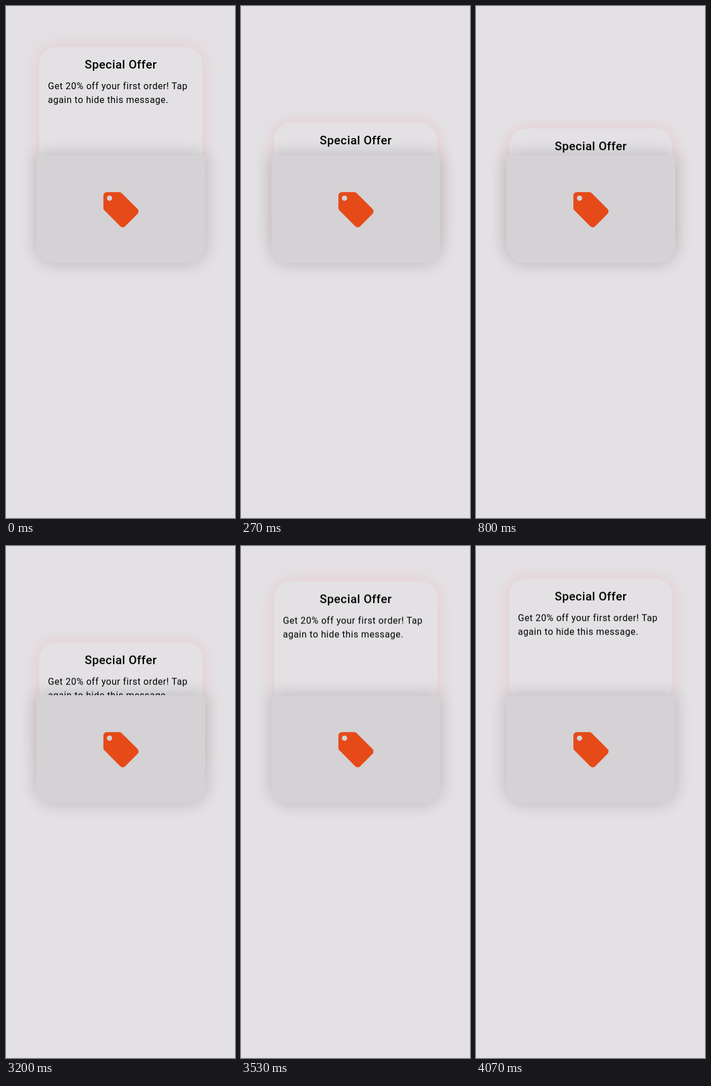
An HTML page that plays this animation: 400x892 px, repeating every 5600 ms.

```html
<!DOCTYPE html>
<html lang="en">
<head>
<meta charset="utf-8">
<title>Sliding offer card</title>
<style>
  html, body { margin: 0; width: 100%; height: 100%; overflow: hidden; background: #e3e1e4; }
  #stage { position: relative; width: 400px; height: 892px; overflow: hidden; }
  .card { position: absolute; box-sizing: border-box; }
  #message {
    left: 58px; top: 57px; width: 285px; height: 215px; border-radius: 30px;
    background: #e3e1e4; box-shadow: 0 0 30px rgba(255, 70, 90, .15);
    color: #000; font-family: Roboto, sans-serif; will-change: transform;
  }
  #message h1, #message p { position: absolute; margin: 0; white-space: nowrap; }
  #message h1 { left: 79.6px; top: 16px; font-size: 20.6px; font-weight: 500; line-height: 30px; letter-spacing: .48px; }
  #message p { left: 15.2px; top: 56.6px; font-size: 16.1px; line-height: 24px; letter-spacing: .54px; }
  #cover {
    left: 53px; top: 260px; width: 295px; height: 188px; border-radius: 0 0 30px 30px;
    background: #d4d2d4; box-shadow: 0 0 30px rgba(0, 0, 0, .2);
  }
  #cover svg { position: absolute; left: 110.5px; top: 57.5px; width: 73.6px; height: 73.6px; fill: #e64a19; }
</style>
</head>
<body>
<div id="stage">
  <div class="card" id="message">
    <h1>Special Offer</h1>
    <p>Get 20% off your first order! Tap<br>again to hide this message.</p>
  </div>
  <div class="card" id="cover">
    <svg viewBox="0 0 24 24"><path d="M21.41 11.58l-9-9C12.05 2.22 11.55 2 11 2H4c-1.1 0-2 .9-2 2v7c0 .55.22 1.05.59 1.42l9 9c.36.36.86.58 1.41.58s1.05-.22 1.41-.59l7-7c.37-.36.59-.86.59-1.41s-.23-1.06-.59-1.42zM5.5 7a1.5 1.5 0 1 1 0-3 1.5 1.5 0 0 1 0 3z"/></svg>
  </div>
</div>
<script>
  const LOOP = 5600, TICK = 1000 / 15, DURATION = 1000;
  const CLOSE_AT = -16, OPEN_AT = 3151, TRAVEL = 156.5;
  const message = document.getElementById('message');

  // Cubic bezier (.18, 1, .04, 1): fast start, long soft landing.
  function ease(x) {
    if (x <= 0) return 0;
    if (x >= 1) return 1;
    let low = 0, high = 1;
    for (let i = 0; i < 24; i++) {
      const s = (low + high) / 2, r = 1 - s;
      if (.54 * s * r * r + .12 * s * s * r + s * s * s < x) low = s;
      else high = s;
    }
    return 1 - (1 - low) ** 3;
  }

  // The picture advances at 15 steps per second, on 10 ms boundaries.
  function snap(time) {
    let step = Math.round(time / TICK);
    if (Math.round(step * TICK / 10) * 10 > time) step--;
    return step * TICK;
  }

  function draw(now) {
    const time = snap(now % LOOP);
    const closed = time < OPEN_AT
      ? ease((time - CLOSE_AT) / DURATION)
      : 1 - ease((time - OPEN_AT) / DURATION);
    message.style.transform = `translateY(${(closed * TRAVEL).toFixed(2)}px)`;
  }

  const start = performance.now();
  function loop() {
    draw(performance.now() - start);
    requestAnimationFrame(loop);
  }
  loop();
</script>
</body>
</html>
```
